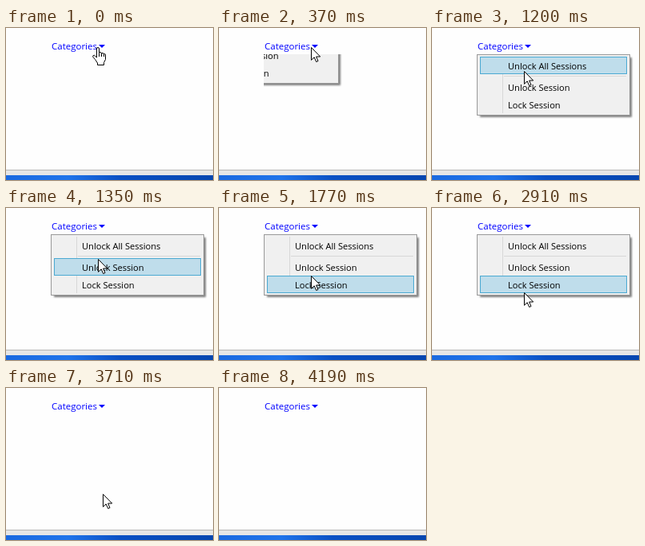
An HTML page for the animation above (5.67 s loop, 259x191 px).

```html
<!DOCTYPE html>
<html lang="en">
<head>
<meta charset="utf-8">
<title>Drop-down menu</title>
<style>
html, body { margin: 0; width: 100%; height: 100%; overflow: hidden; background: #fefefe; }
svg { display: block; width: 259px; height: 191px; font-family: "Open Sans", "Noto Sans", sans-serif; }
.link { font-size: 11.5px; fill: #00f; }
.item { font-size: 11.1px; font-weight: 500; }
.pointer { fill: #fff; stroke: #000; stroke-linejoin: round; }
</style>
</head>
<body>
<svg viewBox="0 0 259 191">
  <defs>
    <linearGradient id="bar">
      <stop offset="0" stop-color="#1a69e0"/>
      <stop offset=".3" stop-color="#2074ea"/>
      <stop offset=".55" stop-color="#0a50c4"/>
      <stop offset="1" stop-color="#0546b0"/>
    </linearGradient>
    <filter id="soft" x="-10%" y="-10%" width="120%" height="120%"><feGaussianBlur stdDeviation="1.2"/></filter>
    <clipPath id="popup"><rect x="56" y="33" width="196" height="81"/></clipPath>
  </defs>
  <rect width="259" height="191" fill="#fefefe"/>
  <rect y="178" width="259" height="7" fill="#e6e6e6"/>
  <rect y="178" width="259" height="1" fill="#b4b4b4"/>
  <rect y="185" width="259" height="6" fill="url(#bar)"/>
  <text class="link" x="57" y="27">Categories</text>
  <path d="M116 21h8l-4 4z" fill="#00f"/>
  <g clip-path="url(#popup)">
    <g id="menu">
      <rect x="60" y="37" width="190" height="75" fill="#000" opacity=".5" filter="url(#soft)"/>
      <rect x="56.5" y="33.5" width="191" height="76" fill="#f0f0f0" stroke="#999"/>
      <path d="M88.5 36V107M90 60.5H243" stroke="#d7d7d7"/>
      <rect id="hover" x="60.5" width="183" height="21" fill="#bfddeb" stroke="#4aa9d2"/>
      <text class="item" x="95" y="52">Unlock All Sessions</text>
      <text class="item" x="95" y="79">Unlock Session</text>
      <text class="item" x="95" y="101">Lock Session</text>
    </g>
  </g>
  <path id="hand" class="pointer" transform="translate(108 24)"
    d="M5.5 13V2Q5.5 .5 7 .5T8.5 2V7.5Q8.5 6.5 10 6.5T11.5 8.5Q11.5 7.5 13 7.5T14.5 9.5Q14.5 8.5 15.5 8.5T16.5 10V15.5L14.5 19.5V22.5H6.5V20L3.5 15.5L.7 12.2Q.5 10 2.5 10.3Z
       M8.5 7.5V12M11.5 8.5V12M14.5 9.5V12"/>
  <path id="arrow" class="pointer" d="M.5 .5V16.3L4.2 12.8L6.7 18.5L9 17.5L6.6 12H11.7Z"/>
</svg>
<script>
const LOOP = 5670;
const [menu, hover, hand, arrow] = ["menu", "hover", "hand", "arrow"].map(id => document.getElementById(id));

// Each track lists [start time, value...]; values hold until the next start.
const pointerTrack = [
  [370, 115, 24], [890, 115, 33], [1040, 115, 44], [1200, 115, 54], [1350, 115, 64],
  [1470, 115, 70], [1620, 115, 74], [1770, 115, 85], [1890, 115, 94], [2010, 115, 102],
  [2160, 115, 103], [2910, 115, 106], [3030, 115, 115], [3180, 115, 125],
  [3710, 121, 133], [3830, 142, 148], [3950, 172, 166], [4070, 206, 183]
];
const hoverTrack = [[1040, 36.5], [1350, 63.5], [1770, 85.5], [3030, null]];
const menuTrack = [[370, 0.5], [520, 1], [3460, 0]];

const valueAt = (track, time) => track.findLast(([start]) => start <= time)?.slice(1);
const show = (node, visible) => node.setAttribute("display", visible ? "inline" : "none");
const move = (node, x, y) => node.setAttribute("transform", `translate(${x} ${y})`);

function render(time) {
  const [open] = valueAt(menuTrack, time) ?? [0];
  show(menu, open > 0);
  move(menu, Math.round(-196 * (1 - open)), Math.round(-81 * (1 - open)));

  const [top] = valueAt(hoverTrack, time) ?? [null];
  show(hover, top !== null);
  if (top !== null) hover.setAttribute("y", top);

  const pointer = valueAt(pointerTrack, time);
  show(hand, !pointer);
  show(arrow, pointer && time < 4190);
  if (pointer) move(arrow, ...pointer);
}

const origin = performance.now();
function tick() {
  render((performance.now() - origin) % LOOP);
  requestAnimationFrame(tick);
}
tick();
</script>
</body>
</html>
```
